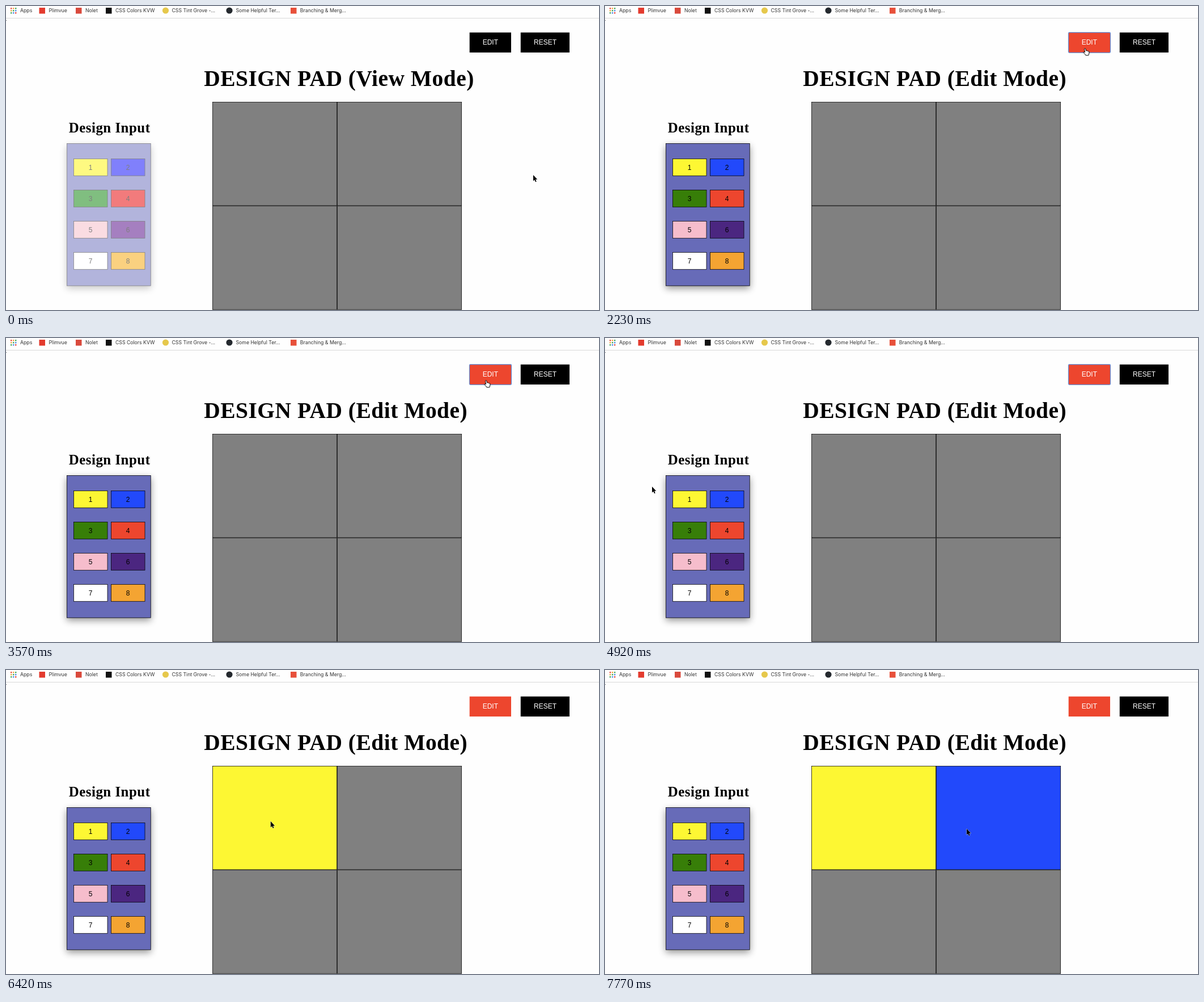
Animation, 1046 px wide and 536 px high, one loop 8 s. Source, as an HTML page:

```html
<!DOCTYPE html>
<html lang="en">
<head>
<meta charset="utf-8">
<title>Design Pad</title>
<style>
  html, body { margin: 0; width: 100%; height: 100%; overflow: hidden; background: #fefefe; }
  svg { display: block; width: 1046px; height: 536px; }
  .bar { font: 8.7px Inter, Roboto, sans-serif; fill: #333; }
  .serif { font-family: "Liberation Serif", Times, serif; font-weight: bold; letter-spacing: .5px; }
  .sans { font: 12px "Liberation Sans", Arial, sans-serif; text-anchor: middle; }
  .thin { stroke-width: .75px; }
</style>
</head>
<body>
<svg viewBox="0 0 1046 536">
  <defs>
    <filter id="blur" x="-30%" y="-30%" width="160%" height="160%"><feGaussianBlur stdDeviation="6.5"/></filter>
  </defs>
  <rect width="1046" height="536" fill="#fefefe"/>
  <g id="bookmarks" class="bar"></g>
  <path d="M0 21.5H1046" stroke="#d9d9d9"/>
  <path d="M0 25.5H1" stroke="#555"/>

  <rect id="edit" x="817.7" y="46.7" width="73.3" height="35.3"/>
  <rect id="ring" x="817.5" y="46.7" width="74" height="35.6" rx="1.5" fill="none" stroke="#5b92e0" stroke-width="1.2"/>
  <rect x="907.8" y="46.7" width="86.2" height="35.3"/>
  <g class="sans" fill="#fff"><text x="854.3" y="68">EDIT</text><text x="951" y="68">RESET</text></g>

  <text id="title" class="serif" x="349.3" y="141" font-size="39.45"></text>
  <text class="serif" x="110.8" y="223.3" font-size="24.9">Design Input</text>
  <g id="cells" class="thin" stroke="#000"></g>

  <rect id="shadow" x="107" y="247" width="148.5" height="251" filter="url(#blur)"/>
  <rect id="panel" class="thin" x="107.4" y="242.4" width="147.8" height="250.8"/>
  <g id="items" class="sans thin"></g>

  <g id="ghost" class="sans thin">
    <rect id="ghostBox" x=".4" y=".4" height="29.9"/>
    <text id="ghostLabel" x="30" y="20"></text>
  </g>
  <path id="arrow" d="M0 0V10.6L2.4 8.4L4 12.2L5.7 11.5L4.1 7.8H7.3Z" stroke="#fff" stroke-width=".9" stroke-opacity=".8" paint-order="stroke"/>
  <path id="hand" fill="#fff" stroke="#000" stroke-linejoin="round"
    d="M-.4 6.5L-1.4 1.2Q-1.4-.2-.3-.2Q.6-.2.9 1L1.6 4Q2.6 3.2 3.6 4.3Q4.8 3.8 5.4 4.9Q6.8 4.6 7 6.2L6.8 9L5.8 12H1L0 10.2L-3.2 7.2Q-3.4 6-2.2 6Z"/>
</svg>
<script>
const LOOP = 8000, BEAT = 149.2, LEAD = 15;
const HOVER = 9, EDIT = 12, LEAVE = 31, PRESS = 36;
const DRAG_1 = 38, DROP_1 = 42, DRAG_2 = 48, FADE_2 = 49, DROP_2 = 50;

const RED = '#ed462e', GRAY = '#808080', YELLOW = '#fdf733', BLUE = '#2249fb';
const editColors = [YELLOW, BLUE, '#377e08', RED, '#f6bdcc', '#4b2680', '#fff', '#f4a432'];
const viewColors = ['#fef981', '#8080fc', '#80be80', '#f27b7c', '#fadce2', '#a57fc0', '#fff', '#fad180'];

// The pointer eases from stop to stop, resting at each from `arrive` to `leave`.
const stops = [
  { arrive: 0, leave: 0, x: 930, y: 298 },
  { arrive: 5, leave: 5, x: 737, y: 170 },
  { arrive: 10, leave: 30, x: 847, y: 75 },
  { arrive: 33, leave: 33, x: 83, y: 262 },
  { arrive: PRESS, leave: 37, x: 139, y: 277 },
  { arrive: 40, leave: DROP_1, x: 495, y: 265 },
  { arrive: 47, leave: 47.5, x: 224, y: 283 },
  { arrive: FADE_2, leave: FADE_2, x: 623, y: 280 },
  { arrive: 52, leave: Infinity, x: 638, y: 280 }
];

const $ = id => document.getElementById(id);
const set = (node, attrs) => { for (const key in attrs) node.setAttribute(key, attrs[key]); };
const show = (node, on) => set(node, { visibility: on ? 'visible' : 'hidden' });
const between = (t, from, to) => t >= from && t < to;
const smooth = p => p * p * (3 - 2 * p);
const grid = (count, columns, draw) =>
  Array.from({ length: count }, (_, i) => draw(i % columns, Math.floor(i / columns), i)).join('');

function pointerAt(beat) {
  const next = stops.findIndex(stop => beat <= stop.leave);
  const to = stops[next], from = stops[next - 1];
  if (beat >= to.arrive) return to;
  const p = smooth((beat - from.leave) / (to.arrive - from.leave));
  return { x: from.x + (to.x - from.x) * p, y: from.y + (to.y - from.y) * p };
}

function buildBookmarks() {
  const square = (x, color) => `<rect x="${x}" y="3" width="10.5" height="10.5" fill="${color}"/>`;
  const circle = (x, color) => `<circle cx="${x + 5.5}" cy="8" r="5.6" fill="${color}"/>`;
  const label = (x, text) => `<text x="${x}" y="11.2">${text}</text>`;
  const dotColors = ['#e8453c', '#f2a33a', '#3fa757', '#4a86e8'];
  $('bookmarks').innerHTML =
    grid(9, 3, (col, row) => `<rect x="${8 + col * 4}" y="${3 + row * 4}" width="2.4" height="2.4" rx=".6" fill="${dotColors[(col + row) % 4]}"/>`) +
    label(25, 'Apps') +
    square(58.5, '#e33b2e') + label(75.5, 'Plimvue') +
    square(123, '#d9493c') + label(140, 'Nolet') +
    square(176, '#111') + label(193, 'CSS Colors KVW') +
    circle(276, '#e6c84c') + label(292.5, 'CSS Tint Grove -...') +
    circle(388.5, '#24292e') + label(405.5, 'Some Helpful Ter...') +
    square(502, '#e8503a') + label(518.8, 'Branching &amp; Merg...');
}

function buildBoard() {
  $('cells').innerHTML = grid(4, 2, (col, row) =>
    `<rect x="${364.4 + col * 220}" y="${169.4 + row * 183.3}" width="219.25" height="182.55"/>`);
  $('items').innerHTML = grid(8, 2, (col, row, i) =>
    `<g transform="translate(${119 + col * 66} ${269 + row * 55})">
      <rect x=".4" y=".4" width="59.6" height="29.9"/><text x="30" y="20">${i + 1}</text></g>`);
}

function drawPanel(editing) {
  const ink = editing ? '#000' : '#7f7f7f';
  set($('shadow'), { opacity: editing ? .42 : .21 });
  set($('panel'), { fill: editing ? '#676bb8' : '#b2b4dc', stroke: ink });
  [...$('items').children].forEach((item, i) => {
    set(item.querySelector('rect'), { fill: (editing ? editColors : viewColors)[i], stroke: ink });
    set(item.querySelector('text'), { fill: ink });
  });
}

function drawGhost(beat, { x, y }) {
  const first = between(beat, DRAG_1, DROP_1), second = between(beat, DRAG_2, DROP_2);
  const fading = second && beat >= FADE_2;
  const place = first ? [x - 20, y - 8] : fading ? [x - 76, y - 14.5] : [x - 38, y - 14];
  show($('ghost'), first || second);
  set($('ghost'), { transform: `translate(${place})`, opacity: fading ? .6 : .85 });
  set($('ghostBox'), {
    width: fading ? 42.5 : 59.6,
    fill: first ? YELLOW : fading ? '#2807e8' : BLUE,
    stroke: fading ? 'none' : '#000'
  });
  $('ghostLabel').textContent = first ? '1' : '2';
}

function render(time) {
  const beat = Math.floor((time + LEAD) / BEAT);
  const pointer = pointerAt(beat);
  const editing = beat >= EDIT;
  const focused = between(beat, EDIT, PRESS);

  $('title').textContent = `DESIGN PAD (${editing ? 'Edit' : 'View'} Mode)`;
  set($('edit'), { fill: editing ? RED : '#000', rx: focused ? 1.5 : 0 });
  show($('ring'), focused);
  drawPanel(editing);

  const fills = [beat >= DROP_1 ? YELLOW : GRAY, beat >= DROP_2 ? BLUE : GRAY, GRAY, GRAY];
  fills.forEach((fill, i) => set($('cells').children[i], { fill }));
  drawGhost(beat, pointer);

  const pointing = between(beat, HOVER, LEAVE);
  for (const id of ['arrow', 'hand']) {
    set($(id), { transform: `translate(${pointer.x} ${pointer.y})` });
    show($(id), (id === 'hand') === pointing);
  }
}

buildBookmarks();
buildBoard();
const start = performance.now();
(function tick() {
  render((performance.now() - start) % LOOP);
  requestAnimationFrame(tick);
})();
</script>
</body>
</html>
```
